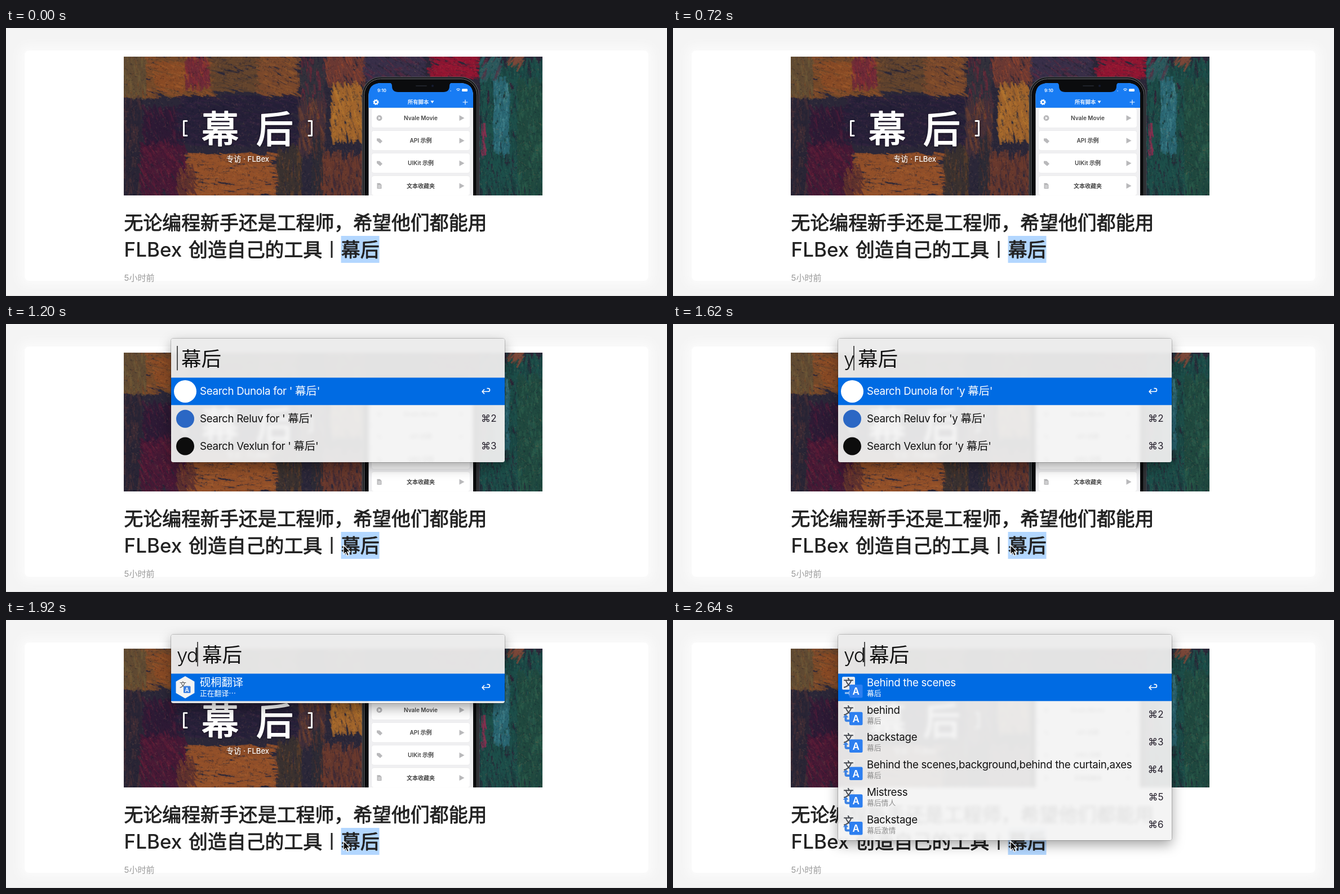
An HTML page with a canvas for the animation above (2940 ms loop, 1173 by 477 pixels).

```html
<!DOCTYPE html>
<html lang="zh-CN">
<head>
<meta charset="utf-8">
<title>Search launcher</title>
<style>
html, body { margin: 0; width: 100%; height: 100%; overflow: hidden; background: #f4f4f4; }
#stage { position: absolute; left: 0; top: 0; width: 1173px; height: 477px; overflow: hidden; }
#stage > * { position: absolute; left: 0; top: 0; }
#stage > #sheet { left: 33px; top: 40px; width: 1107px; height: 410px; border-radius: 8px;
  background: #fff; box-shadow: 0 0 16px 10px #fafafa; }
#stage > #pop { left: 293px; top: 26px; width: 592px; border-radius: 4px; background: rgba(244,244,244,.925);
  -webkit-backdrop-filter: blur(3px) grayscale(.6); backdrop-filter: blur(3px) grayscale(.6);
  box-shadow: 0 0 0 1px rgba(0,0,0,.2), 0 8px 22px rgba(0,0,0,.36); }
#stage > #edge { top: 476px; width: 1173px; height: 1px; background: #e2e2e2; }
text { font-family: Inter, "Noto Sans CJK SC", "Noto Sans CJK", sans-serif; white-space: pre; }
</style>
</head>
<body>
<div id="stage">
  <div id="sheet"></div>
  <div id="edge"></div>
  <canvas id="art" width="1173" height="477"></canvas>
  <svg id="page" width="1173" height="477"></svg>
  <div id="pop"></div>
  <svg id="ui" width="1173" height="477"></svg>
</div>
<script>
const $ = id => document.getElementById(id);
const LOOP = 2940, TICK = 60;
const GREY = '#b9b9bb', BLUE = '#006be3';

// ---- svg helpers
const text = (x, y, size, fill, s, more = '') =>
  `<text x="${x}" y="${y}" font-size="${size}" fill="${fill}" ${more}>${s}</text>`;
const rect = (x, y, w, h, fill, r = 0, more = '') =>
  `<rect x="${x}" y="${y}" width="${w}" height="${h}" rx="${r}" fill="${fill}" ${more}/>`;
const disc = (x, y, r, fill, more = '') => `<circle cx="${x}" cy="${y}" r="${r}" fill="${fill}" ${more}/>`;
const path = (d, fill, more = '') => `<path d="${d}" fill="${fill}" ${more}/>`;
const line = (d, color, w) => path(d, 'none', `stroke="${color}" stroke-width="${w}" stroke-linecap="round" stroke-linejoin="round"`);
const heavy = (color, w) => `stroke="${color}" stroke-width="${w}" stroke-linejoin="round"`;

// ---- painted banner
let seed = 29;
function rnd() {
  seed = seed + 0x6D2B79F5 | 0;
  let t = Math.imul(seed ^ seed >>> 15, 1 | seed);
  t = t + Math.imul(t ^ t >>> 7, 61 | t) ^ t;
  return ((t ^ t >>> 14) >>> 0) / 4294967296;
}

// box, brush angle, main colour, accent
const patches = [
  [209, 51, 160, 72, .3, '#75492a', '#94522a'],
  [209, 51, 38, 70, 1.4, '#5f4a33', '#6d5a38'],
  [270, 62, 48, 48, .3, '#874a26', '#9c5829'],
  [209, 130, 32, 168, 1.5, '#2a2536', '#4a2f35'],
  [245, 145, 70, 70, 1.2, '#2d1b35', '#4d1b38'],
  [240, 210, 80, 88, 1.1, '#451a35', '#641d38'],
  [320, 56, 40, 48, 1.4, '#6d2a38', '#8f3034'],
  [368, 51, 92, 62, .2, '#66452e', '#4f3c30'],
  [452, 51, 66, 70, .4, '#7a482c', '#90552b'],
  [310, 122, 205, 86, .2, '#252038', '#33233f'],
  [326, 224, 152, 74, .1, '#935029', '#9f592b'],
  [305, 252, 30, 46, 1.2, '#5b302f', '#7a402b'],
  [482, 216, 42, 82, 1.5, '#3a3230', '#6b4427'],
  [524, 58, 42, 104, 1.5, '#33323c', '#6d2738'],
  [520, 132, 46, 90, 1.4, '#44303a', '#75432e'],
  [568, 51, 70, 46, 1.2, '#6b3a34', '#93452e'],
  [578, 104, 54, 94, 1.3, '#a0642c', '#b5762e'],
  [552, 226, 82, 72, 1.5, '#6a3a2d', '#452b33'],
  [544, 192, 18, 106, 1.6, '#2c2b35', '#57332e'],
  [640, 51, 100, 48, .6, '#39304a', '#5d2942'],
  [756, 51, 82, 38, .3, '#921631', '#a01a36'],
  [842, 60, 110, 238, 1.5, '#1d504b', '#1a3d3d'],
  [866, 96, 26, 126, 1.6, '#2a6671', '#458a93'],
  [844, 180, 7, 46, 1.5, '#85304f', '#54394d'],
  [844, 54, 34, 34, 2, '#2c5a5e', '#5d2a42'],
  [892, 51, 24, 18, 2.2, '#7e4839', '#5a4238'],
  [908, 96, 44, 202, 1.5, '#20483f', '#2b5d4b']
];

function stroke(c, x, y, a, len, width, color, alpha) {
  const dx = Math.cos(a) * len / 2, dy = Math.sin(a) * len / 2;
  c.globalAlpha = alpha;
  c.strokeStyle = color;
  c.lineWidth = width;
  c.beginPath();
  c.moveTo(x - dx, y - dy);
  c.lineTo(x + dx, y + dy);
  c.stroke();
}

function paint() {
  const c = $('art').getContext('2d');
  c.beginPath();
  c.rect(209, 51, 743, 247);
  c.clip();
  c.fillStyle = '#2b2738';
  c.fillRect(209, 51, 743, 247);
  for (const [x, y, w, h, angle, main, accent] of patches) {
    const count = w * h / 14;
    for (let i = 0; i < count; i++) {
      const mixed = rnd() < .28;
      stroke(c, x + rnd() * w, y + rnd() * h, angle + (rnd() - .5) * .5, 8 + rnd() * 18,
        1 + rnd() * 4, mixed ? accent : main, mixed ? .5 : .75);
    }
  }
  // canvas grain
  for (let i = 0; i < 9000; i++) {
    const light = rnd() < .4;
    stroke(c, 209 + rnd() * 743, 51 + rnd() * 247, rnd() * 3, 1 + rnd() * 4,
      .6 + rnd(), light ? '#c08a62' : '#14182a', light ? .13 : .22);
  }
}

// ---- phone in the banner
const tag = y => path(`M658 ${y - 4}h5l5 5l-4 4l-6 -5z`, GREY);
const cardIcons = [
  y => disc(662.5, y, 5, GREY) + path(`M661 ${y - 2.5}l4 2.5l-4 2.5z`, '#fff'),
  tag, tag,
  y => path(`M658.500 ${y - 5}h5l3 3v7h-8z`, GREY) + line(`M660.500 ${y}h4m-4 2.500h4`, '#fff', .8)
];

function phone() {
  let s = '<clipPath id="ban"><rect x="209" y="51" width="743" height="247"/></clipPath><g clip-path="url(#ban)">';
  s += rect(632.5, 87.5, 206.5, 330, '#0b0c0e', 32, 'stroke="#4a4c51" stroke-width="1.6"');
  s += rect(635.5, 90.5, 200.5, 330, 'none', 29, 'stroke="#77797e" stroke-width="1"');
  s += rect(643.5, 98, 185.5, 300, '#f0f0f2', 22);
  s += path('M643.500 142V120Q643.500 98 666 98H806Q829 98 829 120V142Z', '#187cf4');
  s += path('M680 97H792Q787 98 787 103Q787 114 776 114H696Q685 114 685 103Q685 98 680 97Z', '#0b0c0e');
  s += rect(727, 102, 20, 2, '#20232a', 1) + disc(757, 103, 2, '#161d33');
  s += text(659, 113.5, 7.8, '#fff', '9:10', 'font-weight="600"');
  s += line('M799.500 109.300q3 -2.500 6 0M801 111.300q1.500 -1.300 3 0', '#fff', 1.1);
  s += rect(809, 108.3, 10, 4.8, '#fff', 1.4) + disc(789, 112, .7, '#fff');
  s += disc(656.5, 132, 3, 'none', 'stroke="#fff" stroke-width="2.4"');
  s += disc(656.5, 132, 4.5, 'none', 'stroke="#fff" stroke-width="1.4" stroke-dasharray="1.77"');
  s += text(713, 135.4, 9.3, '#fff', '所有脚本', heavy('#fff', .25));
  s += path('M753.500 129.500h6l-3 4.500z', '#fff') + line('M811 132h8m-4 -4v8', '#fff', 1.1);
  ['Nvale Movie', 'API 示例', 'UIKit 示例', '文本收藏夹'].forEach((name, i) => {
    const y = 160.3 + i * 40.2;
    s += rect(648.5, y - 18, 175, 35.5, '#fff', 4.5, 'stroke="#e3e3e5" stroke-width=".6"');
    s += cardIcons[i](y) + path(`M804.500 ${y - 5}l9 5l-9 5z`, GREY);
    s += text(736, y + 3.7, 10, '#454545', name, 'text-anchor="middle" font-weight="600"');
  });
  return s + '</g>';
}

function page() {
  const bold = heavy('#222', .9), white = heavy('#fff', 2);
  const glow = 'style="filter:drop-shadow(0 1px 2px rgba(0,0,0,.45))"';
  return phone() +
    `<g ${glow}>` +
    line('M321 165.500h-5.500v26h5.500M537 165.500h5.500v26h-5.500', '#fff', 3) +
    text(347, 203.5, 66, '#fff', '幕', white) + text(444, 203.5, 66, '#fff', '后', white) +
    text(391, 238, 13.2, '#fff', '专访 · FLBex', heavy('#fff', .2)) + '</g>' +
    rect(594.5, 370, 68, 48, '#b3d7ff') +
    text(209.5, 359, 33.9, '#222', '无论编程新手还是工程师，希望他们都能用', bold) +
    text(209.5, 406.5, 35, '#222', 'FLBex', 'font-weight="550"') +
    text(324, 406.5, 33.9, '#222', '创造自己的工具', bold) +
    rect(576.5, 379, 3, 30, '#222') +
    text(594.8, 406.5, 33.9, '#222', '幕后', bold) +
    text(209.5, 449.5, 15, '#999', '5小时前');
}

// ---- launcher
const ROW = 48.8, TOP = 95.5;
const cjk = s => s.replace(/[\u4e00-\u9fa5]+/g, m => `<tspan font-size="19.3" letter-spacing="0">${m}</tspan>`);
const label = (y, s, fill) => text(344, y, 18.7, fill, cjk(s), 'letter-spacing="-.3"');

function webIcon(y) {
  return rect(297.5, y + 4, 41, 41, '#dcdcdc', 4, 'stroke="#777" stroke-width="1.4"') +
    line(`M298 ${y + 14.5}h40`, '#8a8a8a', 1) +
    [301, 304.5, 308].map(x => disc(x, y + 9.3, 1.1, 'none', 'stroke="#777" stroke-width=".7"')).join('') +
    rect(311.5, y + 7.3, 24, 4, '#fff', 1, 'stroke="#777" stroke-width=".8"') +
    disc(318, y + 30, 12.5, '#5592e0', 'stroke="#8b97a8" stroke-width="1"') +
    path(`M307 ${y + 26}q5 -7 10 -5l-4 8l3 6l-4 5q-6 -5 -5 -14z`, '#a9b7bd') +
    disc(316.5, y + 27.5, 5, 'none', 'stroke="#fff" stroke-width="2.6"') +
    line(`M320.500 ${y + 31.5}l6 6`, '#fff', 3.4);
}

function wordIcon(y, on) {
  const up = on ? 0 : 1;
  return (on ? rect(300, y + 5.5, 23, 23, '#e9ecf1', 2.5) : rect(302, y + 6, 20, 20, '#ececec', 2)) +
    text(302.5, y + 23 + up, 18, '#3e4249', '文', heavy('#3e4249', .5)) +
    (on ? path(`M305 ${y + 33}h7v-3l5 4.500l-5 4.500v-3h-7z`, '#9cc3f5')
        : path(`M307 ${y + 24}l4.500 5h-3v4h6v4h-6q-4 0 -4 -4v-4h-3z`, '#3d82e2')) +
    rect(313, y + 19.5, 23.5, 23.5, '#2d7ff0', 2.5) +
    text(324.8, y + 37.6, 17, '#fff', 'A', 'text-anchor="middle" font-weight="600"');
}

const hexIcon = y =>
  path(`M318 ${y + 5.5}l15.500 9v19.500l-15.500 9l-15.500 -9v-19.500z`, '#f3f3f3', heavy('#f3f3f3', 2)) +
  text(308, y + 24, 12, '#444', '文') + rect(315, y + 22, 12.5, 12.5, '#3b7fe0', 1.5) +
  text(321.2, y + 32, 10, '#fff', 'A', 'text-anchor="middle" font-weight="600"');

const spot = (color, r) => y => disc(318, y + 24.4, r, color);
const ENGINES = [['Dunola', spot('#fff', 20)], ['Reluv', spot('#2b67c4', 16)], ['Vexlun', spot('#0d0d0d', 16)]];
const search = (q, ready) => ENGINES.map(([name, mark], i) =>
  ({ main: `Search ${name} for '${q} 幕后'`, icon: ready ? mark : i ? webIcon : () => '' }));

const words = [
  ['Behind the scenes', '幕后'], ['behind', '幕后'], ['backstage', '幕后'],
  ['Behind the scenes,background,behind the curtain,axes', '幕后'],
  ['Mistress', '幕后情人'], ['Backstage', '幕后激情']
].map(([main, sub], i) => ({ main, sub, icon: y => wordIcon(y, !i) }));

// start time, typed letters, caret x, query x, rows
const steps = [
  [0],
  [780, '', 304, 311, search('', false)],
  [840, '', 304, 311, search('', true)],
  [1380, 'y', 321, 328, search('y', true)],
  [1740, 'yd', 340, 348, [{ main: '砚桐翻译', sub: '正在翻译⋯', icon: hexIcon }]],
  [1980, 'yd', 340, 348, words]
];

function row({ main, sub, icon }, i) {
  const y = TOP + i * ROW, on = !i;
  let s = on ? rect(293, y, 592, ROW, BLUE) : '';
  s += icon(y) + label(y + (sub ? 22.3 : 30.7), main, on ? '#fff' : '#111');
  if (sub) s += text(344, y + 39.2, 12.8, on ? '#fff' : '#8b8b8b', sub);
  return s + (on
    ? line(`M848.500 ${y + 21}l-3.500 3.700l3.500 3.700M845.500 ${y + 24.7}h10q3 0 3 -2.800t-3 -2.800h-1.500`, '#fff', 1.6)
    : text(870.5, y + 30, 17, '#25202c', '⌘' + (i + 1), 'text-anchor="end"'));
}

const beam = line('M597.500 387q2 0 2 2v12q0 2 -2 2M601.500 387q-2 0 -2 2M599.500 401q0 2 2 2', '#444', .9);
const arrow = path('M599 393.500v16.500l3.800 -3.500l2.700 6l2.900 -1.300l-2.600 -5.800h5.200z', '#111',
  'stroke="#fff" stroke-width="1.2" stroke-linejoin="round"');

function show([, typed, caret, x, rows]) {
  $('pop').style.display = rows ? 'block' : 'none';
  if (!rows) return $('ui').innerHTML = beam;
  $('pop').style.height = TOP + rows.length * ROW + 3.8 - 26 + 'px';
  $('ui').innerHTML =
    path('M293 95.500V30q0 -4 4 -4h584q4 0 4 4v65.500z', 'rgba(226,226,226,.4)') +
    text(303, 74.5, 35, '#111', typed, 'font-weight="300" letter-spacing="-1"') +
    rect(caret - .7, 39, 1.4, 43.5, '#111') +
    text(x, 75, 35.6, '#111', '幕后', 'font-weight="300"') +
    rows.map(row).join('') + arrow;
}

paint();
$('page').innerHTML = page();

let current = null;
function frame() {
  const t = Math.floor(performance.now() % LOOP / TICK) * TICK;
  const step = steps.filter(s => s[0] <= t).pop();
  if (step !== current) show(current = step);
  requestAnimationFrame(frame);
}
frame();
</script>
</body>
</html>
```
